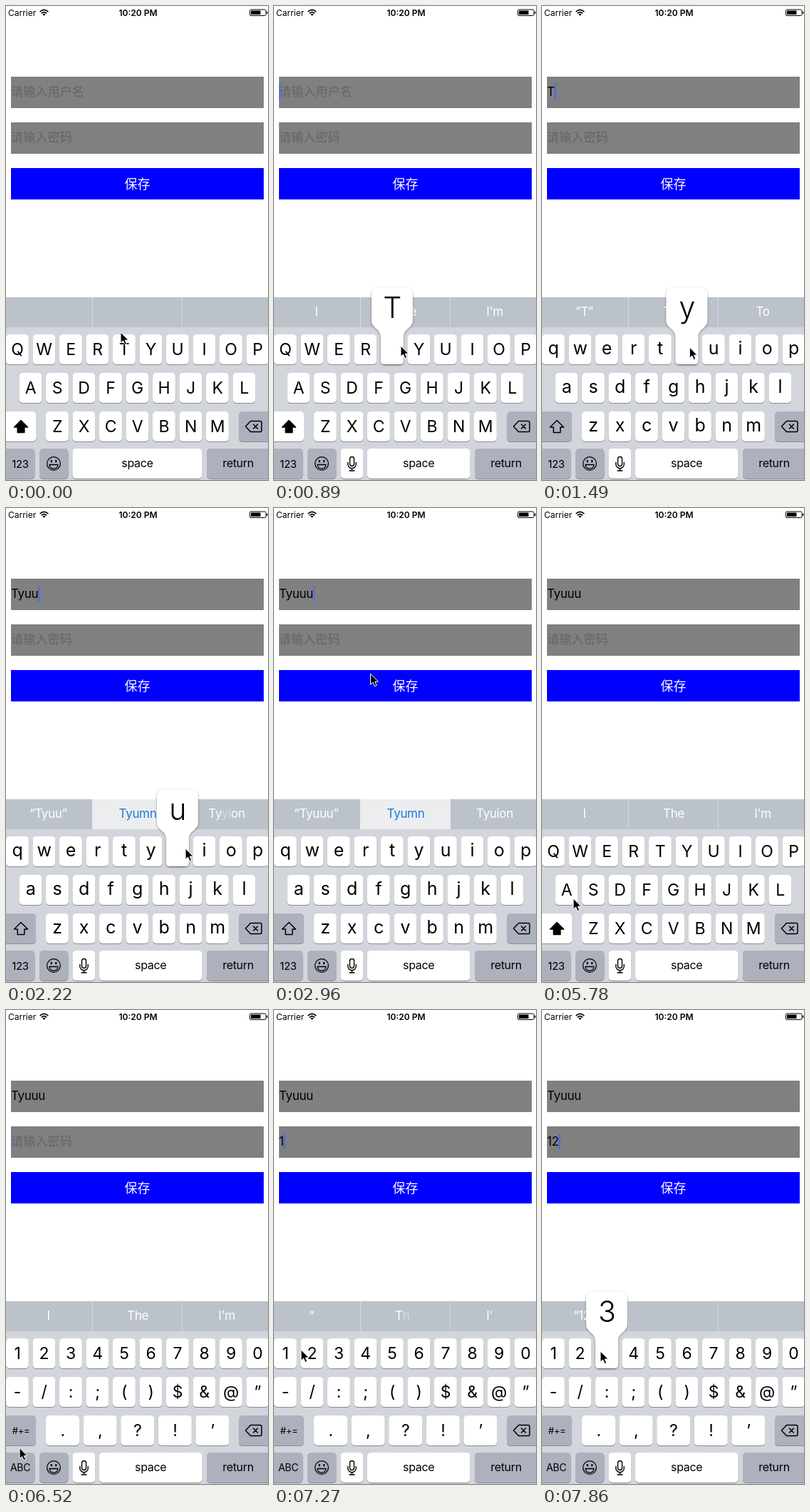
Animation, 368 px wide and 664 px high, one loop 8 s. Source, as an HTML page:

```html
<!DOCTYPE html>
<html lang="zh">
<head>
<meta charset="utf-8">
<title>Login form typing</title>
<style>
  html, body { margin: 0; width: 100%; height: 100%; overflow: hidden; background: #fff; }
  svg { display: block; width: 368px; height: 664px; }
  text { font-family: Inter, "Noto Sans CJK SC", sans-serif; letter-spacing: -.02em; }
  .mid { text-anchor: middle; }
  .line { fill: none; stroke: #000; stroke-width: 1.5; stroke-linecap: round; stroke-linejoin: round; }
</style>
</head>
<body>
<svg id="stage" viewBox="0 0 368 664" xmlns="http://www.w3.org/2000/svg"></svg>
<script>
const LOOP = 8000;
const PITCH = 37.5;
const GREY = "#acb1bd";

// Markup helpers
const rect = (x, y, w, h, fill, rx = 0) =>
  `<rect x="${x}" y="${y}" width="${w}" height="${h}" rx="${rx}" fill="${fill}"/>`;
const label = (text, x, y, size, extra = "") =>
  `<text class="mid" x="${x}" y="${y}" font-size="${size}" ${extra}>${text.replace("&", "&amp;")}</text>`;
const cap = (x, y, w, fill = "#fff") =>
  rect(x, y + 1, w, 42, "#888b90", 5) + rect(x, y, w, 42, fill, 5);

function keyRow(chars, x0, y, lower = false, w = 31.8, pitch = PITCH) {
  return [...chars].map((c, i) => {
    const x = x0 + i * pitch;
    return cap(x, y, w) + label(c, x + w / 2, y + (lower ? 28 : 29.4), lower ? 25 : 23);
  }).join("");
}

function letters(lower) {
  const rows = ["QWERTYUIOP", "ASDFGHJKL", "ZXCVBNM"].map(r => lower ? r.toLowerCase() : r);
  return keyRow(rows[0], 0, 460, lower) + keyRow(rows[1], 18.5, 514, lower) +
    keyRow(rows[2], 56, 568, lower) + cap(-4, 568, 46, lower ? GREY : "#fff") +
    `<path class="line" ${lower ? "" : 'style="fill:#000"'} d="M21 580.5L30.5 590H25.8V597.5H16.2V590H11.5Z"/>` +
    label("123", 20, 646.5, 15);
}

const digits = () =>
  keyRow("1234567890", 0, 460) + keyRow("-/:;()$&@”", 0, 514) +
  keyRow(".,?!’", 56, 568, false, 47, 52.6) + cap(-4, 568, 46, GREY) +
  label("#+=", 21, 594, 13) + label("ABC", 20, 645.5, 14);

const field = y => rect(7, y, 355, 44, "#808080");
const input = (id, y) => `<text id="${id}" x="7" y="${y}" font-size="17"></text>`;

const statusBar =
  `<text x="3" y="13.5" font-size="12" style="letter-spacing:0">Carrier</text>` +
  label("10:20 PM", 185.5, 13.5, 12, 'font-weight="600" style="letter-spacing:0"') +
  `<path class="line" style="stroke-width:1.7;stroke-linecap:butt" d="M47.7 8.1Q53.5 2.8 59.3 8.1M49.9 10.3Q53.5 7 57.1 10.3"/>
   <path d="M53.5 13.8L51.3 11.6Q53.5 9.8 55.7 11.6Z"/>
   <rect x="342.5" y="5" width="22.5" height="8.5" rx="1.5" fill="none" stroke="#000"/>` +
  rect(344, 6.5, 13.5, 5.5, "#000") + rect(366, 7.5, 1.3, 3.5, "#000", .6);

const bottomRow =
  cap(-4, 620, 44.5, GREY) + cap(47, 620, 40.5, GREY) + cap(282, 620, 92, GREY) +
  `<g class="line" style="stroke-width:1.3"><circle cx="67" cy="641" r="9.4"/>
   <path d="M61 642.5H73Q72.3 648.2 67 648.2T61 642.5Z"/></g>
   <ellipse cx="63.8" cy="637.6" rx="1.2" ry="1.9"/><ellipse cx="70.2" cy="637.6" rx="1.2" ry="1.9"/>` +
  label("return", 326, 646, 16);

const spaceKey = x => cap(x, 620, 275.5 - x) + label("space", (x + 275.5) / 2, 646, 16);
const micKey = cap(93.5, 620, 31.8) +
  `<path class="line" style="stroke-width:1.4" d="M109.5 631.5a3 3 0 0 1 3 3v7a3 3 0 0 1-6 0v-7a3 3 0 0 1 3-3ZM103.8 639.5V642a5.7 5.7 0 0 0 11.4 0V639.5M109.5 647.7V651M106 651H113"/>`;

const backspace = cap(327, 568, 46, GREY) +
  `<path class="line" d="M336.5 589L343.5 581.5H357Q359 581.5 359 583.5V594.5Q359 596.5 357 596.5H343.5ZM347.5 586L353.5 592M353.5 586L347.5 592"/>`;

const bubble =
  `<path fill="#fff" filter="url(#soft)" d="M-13 404Q-13 394.5-3.5 394.5H35.3Q44.8 394.5 44.8 404V440
   C44.8 452 31.8 451 31.8 464V497Q31.8 502 26.8 502H5Q0 502 0 497V464C0 451-13 452-13 440Z"/>
   <text id="popChar" class="mid" x="15.9" y="437" font-size="41" font-weight="300"></text>`;

document.getElementById("stage").innerHTML =
  `<defs><filter id="soft" x="-20%" y="-20%" width="140%" height="140%">
     <feDropShadow dx="0" dy="1" stdDeviation="1.6" flood-opacity=".4"/></filter></defs>` +
  rect(0, 0, 368, 664, "#fff") + statusBar +
  field(99) + field(163) + rect(7, 227, 355, 44, "#00f") +
  label("保存", 184.5, 256, 18, 'fill="#fff" style="letter-spacing:0"') +
  input("user", 126) + input("pass", 190) + `<rect id="caret" width="2" height="22" fill="#426bf2"/>` +
  rect(0, 408, 368, 256, "#d2d5db") + rect(0, 408, 368, 42, "#bbc2ca") +
  `<g id="bar"></g>` + backspace + bottomRow +
  `<g id="wide">${spaceKey(93.5)}</g><g id="narrow">${micKey}${spaceKey(131)}</g>
   <g id="upper">${letters(false)}</g><g id="lower">${letters(true)}</g><g id="digits">${digits()}</g>
   <g id="pop">${bubble}</g>
   <path id="pointer" d="M0 0V15.2L3.5 12L6 17.6L8.6 16.4L6.2 11.1H10.9Z" stroke="#fff" stroke-width="1"/>`;

const el = {};
document.querySelectorAll("[id]").forEach(n => el[n.id] = n);

// Timelines: [start, value...]
const layouts = [[0, "upper"], [1100, "lower"], [3400, "upper"], [6360, "digits"]];
const userText = [[0, ""], [1100, "T"], [1620, "Ty"], [1860, "Tyu"], [2060, "Tyuu"], [2500, "Tyuuu"]];
const passText = [[0, ""], [7100, "1"], [7650, "12"]];
const presses = [
  [740, 1100, "T", 4], [1400, 1620, "y", 5], [1740, 1860, "u", 6], [1930, 2060, "u", 6],
  [2180, 2500, "u", 6], [6900, 7100, "1", 0], [7400, 7650, "2", 1], [7790, 8000, "3", 2]
];
const path = [
  [150, 161, 457], [740, 176, 474], [890, 178, 476], [1190, 180, 477], [1400, 206, 478],
  [1600, 209, 478], [1760, 247, 478], [2220, 252, 477], [2500, 252, 477], [3110, 115, 189],
  [4010, 115, 189], [4440, 88, 475], [4960, 88, 475], [5780, 44, 547], [6070, 25, 613],
  [6220, 20, 639], [6400, 20, 639], [6880, 14, 478], [7110, 15, 477], [7270, 38, 476],
  [7640, 43, 476], [7790, 82, 478]
];
// A word is a string or a list of [text, opacity] parts
const suggestions = [
  [0, "", "", ""],
  [150, "I", "The", "I'm"],
  [1150, "“T”", "The", "To"],
  [1640, "“Ty”", "Type", "Types"],
  [1900, "“Tyu”", "Tyumn", "Tyuion"],
  [2130, "“Tyuu”", "Tyumn", [["Ty", 1], ["yi", .4], ["on", 1]]],
  [2520, "“Tyuuu”", "Tyumn", "Tyuion"],
  [3400, "I", "The", "I'm"],
  [7200, [["“", 1], ["1”", 0]], [["T", 1], ["h", .4], ["e", 0]], [["I'", 1], ["m", 0]]],
  [7400, "“1”", "", ""],
  [7700, "“12”", "", ""]
];

const at = (list, t) => list.filter(e => e[0] <= t).pop();
const clamp = v => Math.min(1, Math.max(0, v));
const show = (node, on) => node.setAttribute("display", on ? "inline" : "none");

function pointerAt(t) {
  const i = path.findIndex(p => p[0] > t);
  if (i === 0) return path[0].slice(1);
  if (i < 0) return path[path.length - 1].slice(1);
  const [a, b] = [path[i - 1], path[i]];
  const k = (t - a[0]) / (b[0] - a[0]);
  const e = k * k * (3 - 2 * k);
  return [a[1] + (b[1] - a[1]) * e, a[2] + (b[2] - a[2]) * e];
}

function caretAlpha(t) {
  if (t < 3400) return clamp((t - 380) / 150) * clamp((3100 - t) / 150);
  if (t >= 7100) return 1;
  const p = (t - 3590 + 1000) % 1000;
  return clamp((p - 340) / 150) * clamp((1000 - p) / 150);
}

function fillInput(node, text, hint) {
  node.textContent = text || hint;
  node.setAttribute("fill", text ? "#000" : "#646469");
  node.style.letterSpacing = text ? "" : "0.01em";
  return text ? node.getComputedTextLength() : 0;
}

function drawBar(t) {
  const [, ...words] = at(suggestions, t);
  const picked = t >= 1900 && t < 3400;
  const texts = words.map((word, i) => {
    const parts = typeof word === "string" ? [[word, 1]] : word;
    const spans = parts.map(([s, o]) => `<tspan fill-opacity="${o}">${s}</tspan>`).join("");
    const fill = picked && i === 1 ? "#1c77dc" : "#fff";
    return label(spans, [59.5, 185, 310][i], 433.5, 17, `fill="${fill}"`);
  });
  el.bar.innerHTML = rect(121, 408, 1, 42, "#d3d8dd") + rect(247, 408, 1, 42, "#d3d8dd") +
    (picked ? rect(121, 408, 127, 42, "#ebedef") : "") + texts.join("");
}

function render(t) {
  const layout = at(layouts, t)[1];
  ["upper", "lower", "digits"].forEach(id => show(el[id], id === layout));
  show(el.wide, t < 150);
  show(el.narrow, t >= 150);

  const userWidth = fillInput(el.user, at(userText, t)[1], "请输入用户名");
  const passWidth = fillInput(el.pass, at(passText, t)[1], "请输入密码");
  const second = t >= 3400;
  el.caret.setAttribute("x", 7 + (second ? passWidth : userWidth));
  el.caret.setAttribute("y", second ? 173 : 109);
  el.caret.setAttribute("opacity", caretAlpha(t));

  drawBar(t);

  const press = presses.find(p => t >= p[0] && t < p[1]);
  show(el.pop, press);
  if (press) {
    el.popChar.textContent = press[2];
    el.pop.setAttribute("transform", `translate(${press[3] * PITCH} 0)`);
  }
  el.pointer.setAttribute("transform", `translate(${pointerAt(t)})`);
}

const origin = performance.now();
function tick() {
  render((performance.now() - origin) % LOOP);
  requestAnimationFrame(tick);
}
tick();
</script>
</body>
</html>
```
